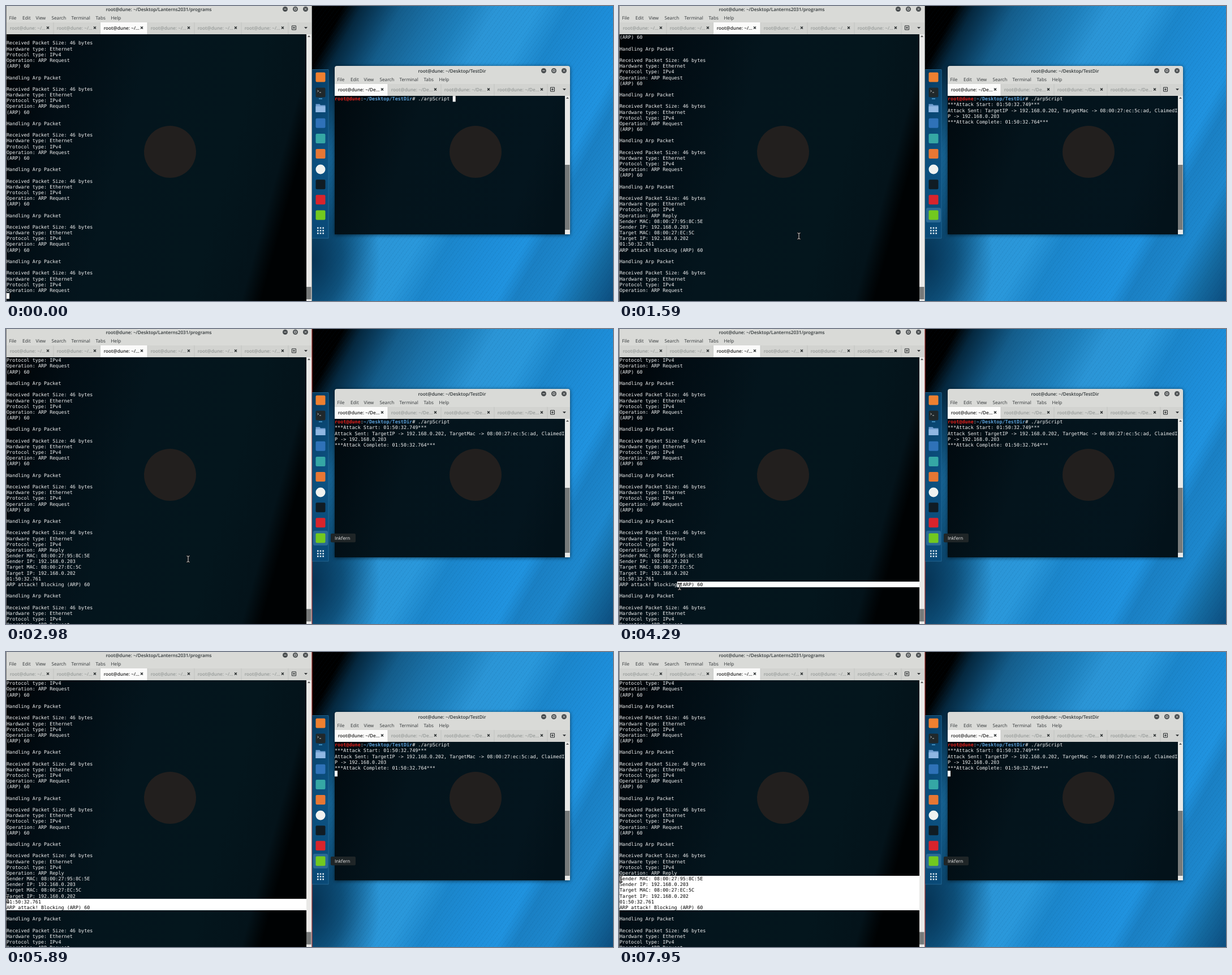
An HTML page that plays this animation: 1073 by 522 pixels, repeating every 8000 ms.

```html
<!DOCTYPE html>
<html lang="en">
<head>
<meta charset="utf-8">
<title>Terminals</title>
<style>
html, body { margin: 0; width: 100%; height: 100%; overflow: hidden; }
body { position: relative; background: #777; }
#desk {
  position: absolute; left: 541px; top: 0; width: 532px; height: 522px;
  background:
    repeating-linear-gradient(127deg, #0000 0 5px, #04345a14 5px 6px),
    radial-gradient(120px 190px at 0 86%, #032a48e0, #03304fa0 45%, #0000),
    linear-gradient(117deg, #000 0, #000 7%, #05283f 11%, #0b3f61 15%, #145d8b 20%, #1a70a6 27%,
      #1e80bc 34%, #2b95d6 41%, #2a98db 50%, #1b86cb 57%, #1d8dd8 66%, #2093df 74%,
      #1a80c4 78%, #1d88ce 86%, #14699f 93%, #0c4d7e);
}
svg { position: absolute; left: 0; top: 0; }
svg text { font: 8.2px "Open Sans", "Noto Sans", sans-serif; text-rendering: geometricPrecision; }
svg text.b { font-weight: 600; }
pre {
  position: absolute; margin: 0; overflow: hidden; color: #f4f4f4;
  font: 8.45px/10.17px "DejaVu Sans Mono", monospace;
  text-rendering: geometricPrecision;
}
#log, #sel { left: 1px; top: 50.3px; width: 530px; height: 471.7px; }
#sel { background: #fff; color: #000; }
#out { left: 581px; top: 159.2px; width: 410px; }
#out b { color: #5b9fd8; }
#out b:first-child { color: #e5211d; }
</style>
</head>
<body>
<div id="desk"></div>
<svg id="chrome" width="1073" height="522"></svg>
<pre id="log"></pre>
<pre id="sel"></pre>
<pre id="out"></pre>
<svg width="1073" height="522">
  <g id="mouse" fill="none">
    <path id="beam" d="M-3-5.5Q0-5.5 0-4Q0-5.5 3-5.5M0-4V4M-3 5.5Q0 5.5 0 4Q0 5.5 3 5.5" stroke="#111" stroke-width="2.4"/>
    <use href="#beam" style="stroke:#ddd;stroke-width:1"/>
    <path d="M-2.5-5.3Q0-5.3 0-4Q0-5.3 2.5-5.3M0-4V4M-2.5 5.3Q0 5.3 0 4Q0 5.3 2.5 5.3" stroke="#ddd"/>
  </g>
</svg>
<script>
const LOOP = 8000, ROW = 10.17, COL = 5.087, TOP = 50.3, SEL_ROW = 39;
const HOST = 'root@dune';
const $ = id => document.getElementById(id);

const rect = (x, y, w, h, fill, more = '') =>
  `<rect x="${x}" y="${y}" width="${w}" height="${h}" fill="${fill}" ${more}/>`;
const circle = (x, y, r, fill) => `<circle cx="${x}" cy="${y}" r="${r}" fill="${fill}"/>`;
const label = (x, y, s, fill = '#303436', more = '') =>
  `<text x="${x}" y="${y + 3}" fill="${fill}" ${more}>${s}</text>`;
const line = (d, color, w = 1, more = '') =>
  `<path d="${d}" stroke="${color}" stroke-width="${w}" fill="none" ${more}/>`;

// Window frame: title, menu, tabs and terminal ground
function frame({ x, y, w, h, title, titleX, tab, tabs, active, pitch, paint, markX, thumb }) {
  const bar = y + 32, barH = 21, body = bar + barH, right = x + w, term = right - 9;
  let s = rect(x, y, w, h, '#d9dad7', 'rx="4"') + rect(x, body, w, y + h - body, '#e9e9e7');
  s += label(titleX, y + 8.5, title, '#2e3436', 'class="b" text-anchor="middle"');
  for (let i = 0; i < 3; i++) {
    const cx = right - 46.5 + 18 * i, cy = y + 8.5;
    s += circle(cx, cy, 4.5, '#4a4e50');
    s += line([`M${cx - 2} ${cy}h4`, `M${cx - 1.7} ${cy - 1.7}h3.4v3.4h-3.4z`,
      `M${cx - 1.7} ${cy - 1.7}l3.4 3.4m0-3.4l-3.4 3.4`][i], '#e4e4e2', .9);
  }
  ['File', 'Edit', 'View', 'Search', 'Terminal', 'Tabs', 'Help'].forEach((m, i) =>
    s += label(x + [4.5, 28, 51.5, 79.5, 114.5, 157.5, 184.5][i], y + 24, m));
  s += rect(x, bar, w, barH, '#d2d3d0');
  for (let i = 0; i < tabs; i++) {
    const tx = x + i * pitch, on = i === active, cx = tx + pitch - 10, cy = bar + 9.5;
    if (on) s += rect(tx, bar, pitch, barH, '#fbfbfa');
    s += line(`M${tx + pitch} ${bar}v${barH}`, '#bcbebb', .7);
    s += label(tx + 5.7, cy, tab, on ? '#222' : '#969a98', 'class="b"');
    s += line(`M${cx - 2} ${cy - 2}l4 4m0-4l-4 4`, '#25292b', 1.3);
  }
  const px = right - 31, py = bar + 9.5;
  s += line(`M${px - 3.5} ${py - 3.5}h7v7h-7zM${px - 2} ${py}h4M${px} ${py - 2}v4`, '#25292b');
  s += `<path d="M${right - 13} ${py - 1.2}h6l-3 3z" fill="#25292b"/>`;
  s += rect(x, body, w - 9, y + h - body, `url(#${paint})`);
  s += circle(markX, 258, 46, '#221f1e');
  s += `<path d="M${term + 2} ${body + 5}l2.5-3 2.5 3z" fill="#555"/>`;
  return s + rect(term, thumb[0], 8.5, thumb[1], '#777a7a', 'class="thumb"');
}

const stops = list => list.map(([o, c]) => `<stop offset="${o}" stop-color="${c}"/>`).join('');
const ink = (id, x1, y1, x2, y2, list) => `<linearGradient id="${id}" gradientUnits="userSpaceOnUse"
  x1="${x1}" y1="${y1}" x2="${x2}" y2="${y2}">${stops(list)}</linearGradient>`;

const icons = ['#ee8030', '#20282b', '', '#2f72b8', '#35a7a5', '#e77734', '', '#101c24', '#d8242c', '#72c91f'];

function dock() {
  let s = rect(541, 112, 29.5, 299, '#0a4e7f', 'opacity=".72" rx="2"');
  s += line('M541 112.5H570V411H541', '#3b82ad', .5);
  s += rect(543, 357, 26, 26, '#8cc5e8', 'id="hover" opacity=".25" rx="3"');
  icons.forEach((c, i) => {
    if (c) s += rect(547.5, 117.5 + 27.1 * i, 17, 17, c, 'rx="2"');
  });
  s += line('M550.5 149l2 1.5-2 1.5M554 153h3', '#e8e8e8', .8) + rect(553, 163.5, 6, 1.2, '#63b7ea');
  s += '<path d="M547.5 173.5h7l1.5 2h8.5v12.5h-17z" fill="#6f9ed0"/>' + rect(547.5, 177.5, 17, 10.5, '#8fb7e2');
  s += circle(556, 289, 8.5, '#f0f2f0');
  for (let i = 0; i < 9; i++)
    s += rect(550 + 4.7 * (i % 3), 391.5 + 4.7 * Math.floor(i / 3), 2.6, 2.6, '#dce8ef');
  return s;
}

$('chrome').innerHTML = '<defs>'
  + ink('inkL', 0, 50, 540, 200, [[0, '#000306'], [.2, '#020d14'], [.45, '#04151d'],
    [.78, '#04161d'], [.94, '#04131a'], [.98, '#01070a'], [1, '#000203']])
  + ink('inkR', 581, 158, 988, 300, [[0, '#01090e'], [.35, '#04141c'], [.85, '#04151e'], [1, '#03121a']])
  + '</defs>'
  + frame({ x: 1, y: -3, w: 539, h: 530, title: HOST + ': ~/Desktop/Lanterns2031/programs', titleX: 270,
    tab: HOST + ': ~/...', tabs: 6, active: 2, pitch: 83, paint: 'inkL', markX: 290, thumb: [497, 22] })
  + line('M540.5 0V522', '#9a9c9b') + line('M541 0V522', '#c03a36', 1, 'id="edge"')
  + dock()
  + '<g style="filter:drop-shadow(0 1px 3px #0009)">'
  + frame({ x: 581, y: 106, w: 416, h: 298, title: HOST + ': ~/Desktop/TestDir', titleX: 788.5,
    tab: HOST + ': ~/De...', tabs: 4, active: 0, pitch: 94, paint: 'inkR', markX: 830, thumb: [281, 115] })
  + '</g><g id="tip">' + rect(574, 362, 44, 15.5, '#1f2527', 'rx="2"') + label(581, 369.7, 'Inkfern', '#f0f0f0') + '</g>'
  + rect(1, 508, 5, 10.2, '#fff', 'id="curL"') + rect(581, 159.2, 5, 10.2, '#fff', 'id="curR"');

const head = ['Received Packet Size: 46 bytes', 'Hardware type: Ethernet', 'Protocol type: IPv4'];
const tail = ['', 'Handling Arp Packet', ''];
const request = [...head, 'Operation: ARP Request', '(ARP) 60', ...tail];
const reply = [...head, 'Operation: ARP Reply', 'Sender MAC: 08:00:27:95:8C:5E', 'Sender IP: 192.168.0.203',
  'Target MAC: 08:00:27:EC:5C', 'Target IP: 192.168.0.202', '01:50:32.761', 'ARP attack! Blocking (ARP) 60', ...tail];
const doc = ['', ...Array(6).fill(request).flat(), ...reply, ...request, ...request];

const prompt = `<b>${HOST}</b>:<b>~/Desktop/TestDir</b># ./arpScript `;
const result = prompt + `
***Attack Start: 01:50:32.749***
Attack Sent: TargetIP -> 192.168.0.202, TargetMac -> 08:00:27:ec:5c:ad, ClaimedI
P -> 192.168.0.203
***Attack Complete: 01:50:32.764***`;

// Log state: from time, first visible line, lines written
const views = [[0, 0, 45], [860, 21, 66], [2030, 29, 74], [2800, 24, 74], [2980, 19, 74]];

// Pointer moves: start, end, steps, end x, end y
const moves = [
  [1230, 1590, 5, 318, 407], [1780, 2280, 7, 322, 407], [3230, 3410, 3, 149, 459],
  [3690, 3870, 3, 150, 456], [4050, 4830, 10, 7, 456], [4910, 5000, 2, 3, 447.5],
  [5560, 5650, 2, 3, 441], [5890, 5980, 2, 3, 434], [6350, 6530, 3, 3, 426],
  [6710, 6800, 2, 3, 425], [6980, 7340, 5, 3, 411], [7770, 7950, 3, 3, 401]];

function pointer(t) {
  let x = 852, y = 320;
  for (const [a, b, n, tx, ty] of moves) {
    if (t < a) break;
    const k = Math.min(n, Math.floor((t - a) / (b - a) * (n - 1) + 1e-6) + 1) / n;
    x += (tx - x) * k;
    y += (ty - y) * k;
  }
  return [x, y];
}

const show = (id, on) => $(id).style.display = on ? '' : 'none';
const setHtml = (id, s) => { if ($(id).shown !== s) $(id).innerHTML = $(id).shown = s; };

function draw() {
  const t = performance.now() % LOOP, ran = t >= 860;
  const [, top, end] = views.findLast(v => t >= v[0]);
  const text = doc.slice(top, Math.min(end, top + 47)).join('\n');
  setHtml('log', text);
  setHtml('sel', text);
  setHtml('out', ran ? result : prompt);

  const blink = Math.floor((t - 2620) / 589) & 1;
  show('curL', t < 2800 && (!ran || blink));
  show('curR', ran ? blink : t < 280 || t >= 680);
  $('curR').setAttribute('x', ran ? 581 : 789.7);
  $('curR').setAttribute('y', ran ? 210.1 : 159.2);
  document.querySelector('.thumb').setAttribute('y', t < 2800 ? 497 : 495.5);

  show('hover', t >= 1410);
  show('tip', t >= 1780);
  show('edge', t >= 1780);

  const [x, y] = pointer(t);
  show('mouse', t >= 1230);
  $('mouse').setAttribute('transform', `translate(${x} ${y})`);

  show('sel', t >= 4050);
  const first = Math.min(SEL_ROW, Math.floor((y - TOP) / ROW));
  const left = first < SEL_ROW ? 0 : Math.round((x - 1) / COL - .4) * COL;
  $('sel').style.clipPath = `inset(${first * ROW}px 0 ${471.7 - (SEL_ROW + 1) * ROW}px ${left}px)`;
  requestAnimationFrame(draw);
}
draw();
</script>
</body>
</html>
```
